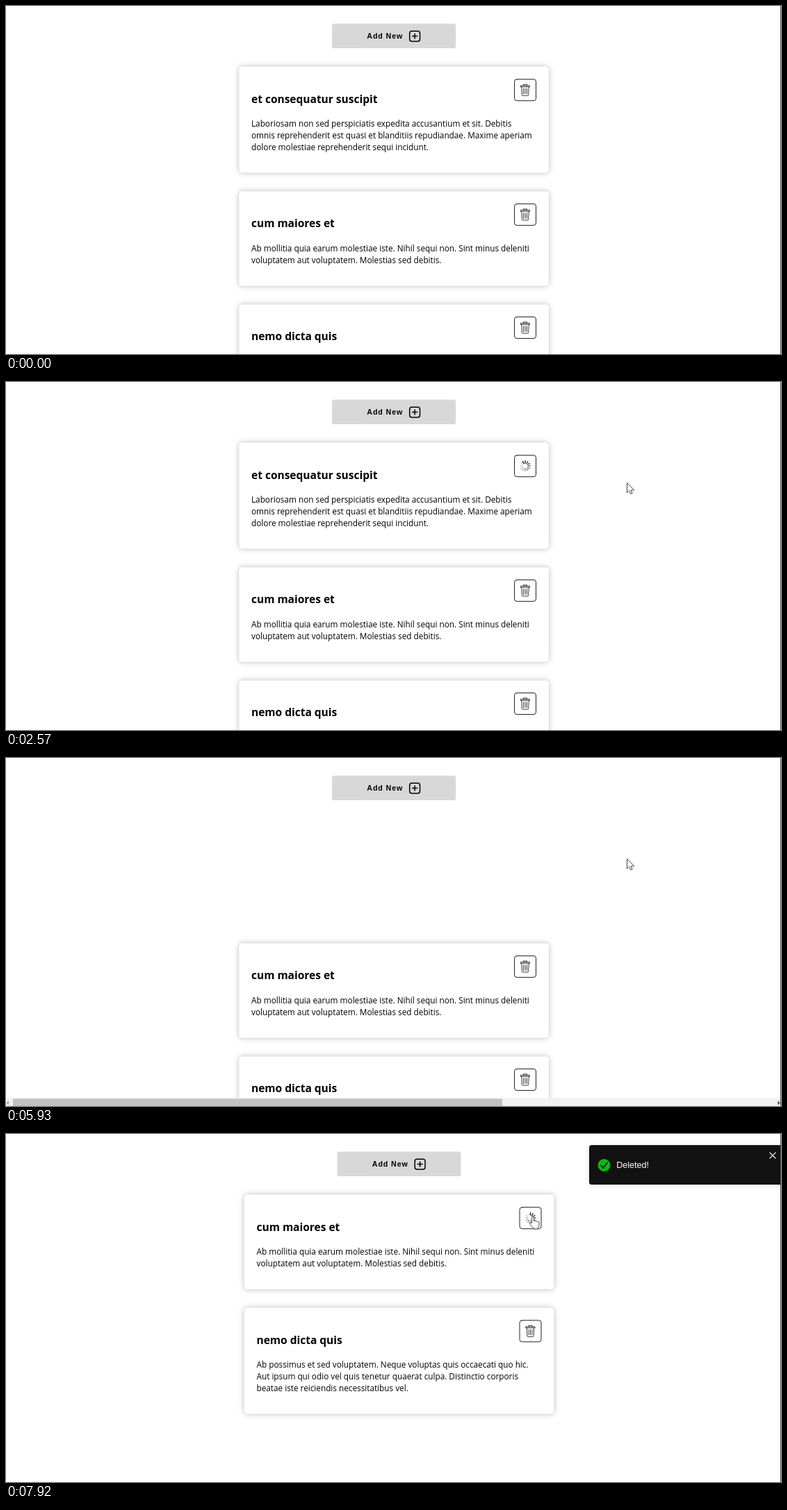
These frames come from a looping animation (1115 by 502 pixels, 8000 ms). An HTML page:

```html
<!DOCTYPE html>
<html lang="en">
<head>
<meta charset="utf-8">
<title>Delete a note</title>
<style>
  html, body { margin: 0; width: 100%; height: 100%; overflow: hidden; background: #fff; }
  svg { display: block; width: 1115px; height: 502px; }
  text { font: 11.78px "Open Sans", "Noto Sans", sans-serif; fill: #000; white-space: pre; }
  .title { font-size: 15.5px; font-weight: 700; }
  .label { font: 700 10.67px "Liberation Sans", Arial, sans-serif; letter-spacing: .9px; }
  .message { font: 12.6px "Liberation Sans", Arial, sans-serif; fill: #fff; }
  .panel { fill: #fff; filter: drop-shadow(0 0 4px rgba(0, 0, 0, .27)); }
  .dark { fill: #121212; filter: drop-shadow(0 1px 4px rgba(0, 0, 0, .12)); }
  .line { fill: none; stroke: #222; stroke-linecap: round; stroke-linejoin: round; }
  .pointer { fill: #fff; stroke: #333; stroke-width: .9; stroke-linejoin: round; }
</style>
</head>
<body>
<svg id="stage" viewBox="0 0 1115 502"></svg>
<script>
const LOOP = 8000, CLICK = 2060, EXIT = 5715, REMOVED = 6290, SECOND_CLICK = 7340;
const TOAST = { start: 5748, length: 700 };
const SPIN_STEP = 70, LINE = 16.6, GAP = 26.7;

const notes = [
  ["et consequatur suscipit",
    "Laboriosam non sed perspiciatis expedita accusantium et sit. Debitis",
    "omnis reprehenderit est quasi et blanditiis repudiandae. Maxime aperiam",
    "dolore molestiae reprehenderit sequi incidunt."],
  ["cum maiores et",
    "Ab mollitia quia earum molestiae iste. Nihil sequi non. Sint minus deleniti",
    "voluptatem aut voluptatem. Molestias sed debitis."],
  ["nemo dicta quis",
    "Ab possimus et sed voluptatem. Neque voluptas quis occaecati quo hic.",
    "Aut ipsum qui odio vel quis tenetur quaerat culpa. Distinctio corporis",
    "beatae iste reiciendis necessitatibus vel."],
];

// Pointer tip: [time, x, y]
const pointerPath = [
  [780, 326, 490], [960, 600, 285], [1050, 808, 142], [1110, 802, 125], [1160, 802, 125],
  [1360, 749, 119.5], [2110, 749, 119.5], [2230, 790, 232], [2450, 893.5, 145.5],
  [6480, 893.5, 145.5], [6930, 757, 118.5], [7340, 757, 118.5], [7400, 758, 119.5], [LOOP, 758, 119.5],
];

// Toast keyframes: [progress, offset]
const bounce = [[0, 2670], [.6, -25], [.75, 10], [.9, -5], [1, 0]];

const cardHeight = note => 103.2 + LINE * (note.length - 1);

const spokes = Array.from({ length: 12 }, (_, i) =>
  `<path class="line" d="M0-4V-7.4" stroke-width="1.5" opacity="${1 - i / 12.5}" transform="rotate(${i * 30})"/>`).join("");

const cardMarkup = (note, i) => `
  <g id="card${i}">
    <rect class="panel" x="335.3" width="445.6" height="${cardHeight(note)}" rx="5"/>
    <text class="title" x="353" y="52">${note[0]}</text>
    ${note.slice(1).map((row, k) => `<text x="353" y="${86.8 + k * LINE}">${row}</text>`).join("")}
    <rect class="line" x="731.5" y="18.1" width="31" height="31" rx="3.5"/>
    <g transform="translate(747 33.5)">
      <path id="trash${i}" class="line" d="M-6.5-6.3H6.5V-4.5H-6.5ZM-2.5-6.3V-8H2.5V-6.3M-5.2-4.5L-4.6 7q.1 1.2 1.1 1.2H3.5q1 0 1.1-1.2L5.2-4.5M-2.4-2V5.6M0-2V5.6M2.4-2V5.6" stroke-width=".9"/>
      <g id="spin${i}">${spokes}</g>
    </g>
  </g>`;

document.getElementById("stage").innerHTML = `
  <g id="page">
    <rect x="469" y="25.5" width="178" height="35.5" rx="3" fill="#d8d8d8"/>
    <text class="label" x="519.3" y="47">Add New</text>
    <rect class="line" style="stroke:#000" x="580.7" y="36.2" width="14.8" height="14.8" rx="3.2" stroke-width="1.5"/>
    <path class="line" style="stroke:#000" d="M584.6 43.6h7M588.1 40.1v7" stroke-width="1.5"/>
    ${notes.map(cardMarkup).join("")}
  </g>
  <g id="scrollbar">
    <rect y="490.5" width="1115" height="12" fill="#f1f1f1"/>
    <rect id="thumb" x="10" y="491.5" height="10.5" fill="#c1c1c1"/>
    <path d="M4 494.5v6l-3.5-3z" fill="#a3a3a3"/>
    <path d="M1110.5 494.5v6l3.5-3z" fill="#505050"/>
  </g>
  <g id="toast">
    <rect class="dark" y="16" width="285" height="57" rx="3.5"/>
    <circle cx="21.5" cy="45" r="9" fill="#07bc0c"/>
    <path class="line" d="M17 45.5l3.2 3.3 6-7.3" style="stroke:#121212" stroke-width="1.8"/>
    <text class="message" x="39.2" y="49.3">Deleted!</text>
    <path class="line" d="M260 27l8 8m0-8l-8 8" style="stroke:#c8c8c8" stroke-width="1.7"/>
  </g>
  <path id="arrow" class="pointer" d="M0 0V14.2L3.3 11.2 5.5 16 7.6 15 5.5 10.4H10.2Z"/>
  <path id="hand" class="pointer" d="M-1.4 9V.6a1.4 1.4 0 0 1 2.8 0V6q1.2-1 2.6.3q1.5-.8 2.5.5q2-.6 2.5 1.2v3.4q-.3 2.5-1.6 4V17.5H1V16L-4.6 10.5q-.6-2 1.2-2z"/>
  <rect x="1114" width="1" height="502" fill="#555"/>`;

const part = id => document.getElementById(id);
const show = (id, on) => part(id).setAttribute("visibility", on ? "inherit" : "hidden");
const move = (id, x, y = 0) => part(id).setAttribute("transform", `translate(${x} ${y})`);
const easeOut = p => 1 - (1 - p) ** 3;
const smooth = p => p * p * (3 - 2 * p);

// Interpolates rows of [position, ...values].
function sample(rows, at, ease) {
  const k = Math.max(1, rows.findIndex(row => row[0] >= at));
  const [a, b] = [rows[k - 1], rows[k]];
  const p = ease((at - a[0]) / (b[0] - a[0]));
  return a.slice(1).map((v, i) => v + (b[i + 1] - v) * p);
}

// Underdamped spring, stiffness 500 and damping 25
function spring(ms) {
  const s = Math.max(0, ms) / 1000, w = 18.54;
  return 1 - Math.exp(-12.5 * s) * (Math.cos(w * s) + 12.5 / w * Math.sin(w * s));
}

function drawCards(t) {
  const removed = t >= REMOVED;
  const slide = 890 * spring(t - EXIT);
  move("page", removed ? 7.5 : 0);
  let y = 87.6;
  notes.forEach((note, i) => {
    const gone = removed && i === 0;
    const busy = i === 0 ? t >= CLICK : i === 1 && t >= SECOND_CLICK;
    show("card" + i, !gone);
    show("trash" + i, !busy);
    show("spin" + i, busy);
    move("card" + i, i === 0 ? slide : 0, y);
    if (!gone) y += cardHeight(note) + GAP;
  });
  const firstHead = 11 + Math.floor((t - 2570) / SPIN_STEP);
  const secondHead = Math.floor((t - 7920) / SPIN_STEP);
  part("spin0").setAttribute("transform", `rotate(${firstHead * 30})`);
  part("spin1").setAttribute("transform", `rotate(${secondHead * 30})`);

  const contentWidth = 781 + slide;
  show("scrollbar", !removed && contentWidth > 1117);
  part("thumb").setAttribute("width", Math.min(1095, 1097 * 1117 / contentWidth));
}

function drawToast(t) {
  const p = Math.min(1, (t - TOAST.start) / TOAST.length);
  show("toast", p >= 0);
  if (p < 0) return;
  const [offset] = sample(bounce, p, easeOut);
  move("toast", (t < REMOVED ? 824 : 839) + offset);
  part("toast").setAttribute("opacity", easeOut(Math.min(1, p / .6)));
}

function drawPointer(t) {
  const visible = t >= pointerPath[0][0];
  const [x, y] = visible ? sample(pointerPath, t, smooth) : [0, 0];
  const left = t < REMOVED ? 731 : 738.5;
  const over = x > left && x < left + 32 && y > 105 && y < 138;
  show("arrow", visible && !over);
  show("hand", visible && over);
  move("arrow", x, y);
  move("hand", x, y);
}

function frame() {
  const t = performance.now() % LOOP;
  drawCards(t);
  drawToast(t);
  drawPointer(t);
  requestAnimationFrame(frame);
}
frame();
</script>
</body>
</html>
```
